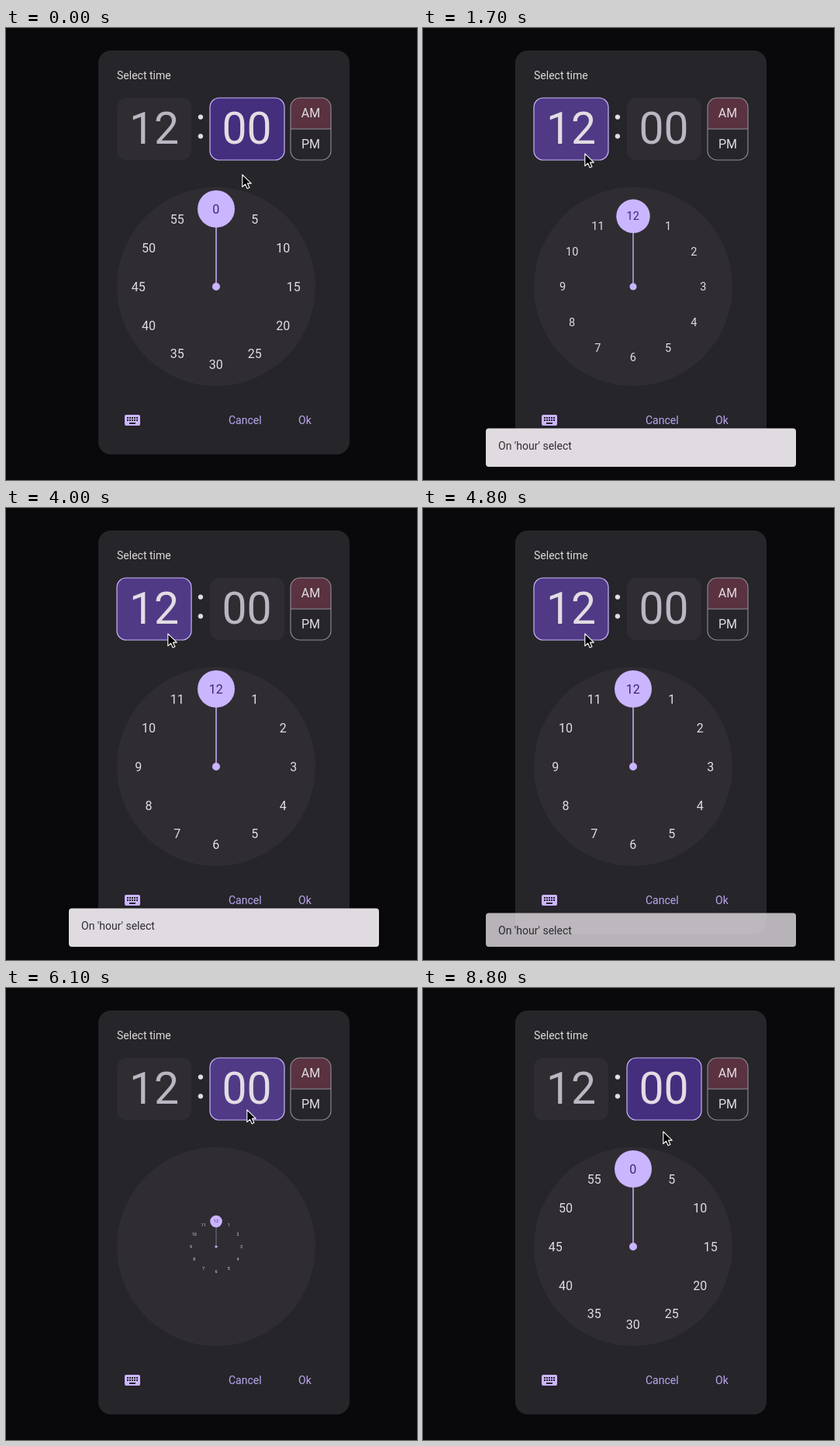
Recreate the animation shown at these times as an HTML page. Size 530x582 px, loop 8.9 s.

```html
<!DOCTYPE html>
<html lang="en">
<head>
<meta charset="utf-8">
<title>Time picker</title>
<style>
html, body { margin: 0; width: 100%; height: 100%; overflow: hidden; background: #09080b; }
svg { display: block; width: 530px; height: 582px; font: 14px Roboto, sans-serif; }
.mid { text-anchor: middle; }
.big { font-size: 57px; }
.num, .half { font-size: 16px; fill: #e2dde3; }
.accent { fill: #cab5ff; }
.label { fill: #bca7f3; }
</style>
</head>
<body>
<svg viewBox="0 0 530 582">
  <rect width="530" height="582" fill="#09080b"/>
  <rect x="119" y="29" width="324" height="520" rx="16" fill="#262529"/>
  <text x="143" y="66" fill="#dedade">Select time</text>

  <g id="hour">
    <rect x="143" y="90" width="96" height="80" rx="12"/>
    <text class="big mid" x="191" y="149">12</text>
  </g>
  <text class="big mid" x="251" y="142" fill="#e2dde3">:</text>
  <g id="minute">
    <rect x="263" y="90" width="96" height="80" rx="12"/>
    <text class="big mid" x="310.5" y="149">00</text>
  </g>

  <path d="M367 130V102a12 12 0 0 1 12-12h28a12 12 0 0 1 12 12v28z" fill="#5a3240"/>
  <path d="M367 130h52" stroke="#928f99"/>
  <rect x="367" y="90" width="52" height="80" rx="12" fill="none" stroke="#928f99" stroke-width="1.1"/>
  <text class="half mid" x="393" y="114.5">AM</text>
  <text class="half mid" x="393" y="154.5">PM</text>

  <circle cx="271" cy="333" r="128" fill="#2f2d32"/>
  <g id="dial">
    <path d="M0 0V-78" stroke="#cab5ff" stroke-width="1.5"/>
    <circle class="accent" r="5"/>
    <circle class="accent" cy="-100" r="24"/>
  </g>

  <g id="keys" transform="translate(151 493)">
    <rect class="accent" x="2" y="5" width="20" height="14" rx="2"/>
  </g>
  <text class="label" x="287" y="510">Cancel</text>
  <text class="label" x="377" y="510">Ok</text>

  <g id="snack" style="filter:drop-shadow(0 1px 2px rgba(0,0,0,.5))">
    <rect x="81" width="400" rx="4" fill="#e0dbe0"/>
    <text x="97" fill="#302e33">On 'hour' select</text>
  </g>

  <path id="cursor" d="M.8.8V16.6l3.8-3.5 2.5 5.7 2.8-1.2-2.5-5.5h4.9z"
    fill="#000" stroke="#fff" stroke-width="1.1" stroke-linejoin="round"/>
</svg>
<script>
const LOOP = 8900, STEP = 100;
const HOUR_CLICK = 1361, MINUTE_CLICK = 6014, ANIM = 200;
const SNACK_IN = 1420, SNACK_OUT = 4780;
// time, x, y of the pointer tip
const POINTER = [
  [0, 304, 188], [1300, 304, 188], [1361, 208, 161], [5800, 208, 161],
  [6000, 310, 156], [6900, 310, 156], [7200, 309, 180], [7400, 309, 184], [LOOP, 309, 184]
];

const $ = id => document.getElementById(id);
const clamp = v => Math.min(1, Math.max(0, v));
const outQuad = p => 1 - (1 - p) ** 2;
const ramp = (t, start) => outQuad(clamp((t - start) / ANIM));

function add(parent, tag, attrs, text = '') {
  const el = document.createElementNS('http://www.w3.org/2000/svg', tag);
  for (const k in attrs) el.setAttribute(k, attrs[k]);
  el.textContent = text;
  return parent.appendChild(el);
}

for (let i = 0; i < 10; i++)
  add($('keys'), 'rect', { x: 5 + i % 5 * 3, y: i < 5 ? 8 : 11, width: 2, height: 2, fill: '#262529' });
add($('keys'), 'rect', { x: 8, y: 15, width: 8, height: 2, fill: '#262529' });

const numbers = Array.from({ length: 12 }, (_, i) => {
  const a = i * Math.PI / 6;
  const el = add($('dial'), 'text', {
    class: 'num mid', x: 100 * Math.sin(a) - 0.3, y: 5.7 - 100 * Math.cos(a)
  });
  if (!i) el.style.fill = '#3c2678';
  return el;
});

function pointerAt(t) {
  const i = POINTER.findIndex(p => p[0] > t);
  const [t0, x0, y0] = POINTER[i - 1], [t1, x1, y1] = POINTER[i];
  const k = (t - t0) / (t1 - t0);
  return [x0 + (x1 - x0) * k, y0 + (y1 - y0) * k];
}

function paintBox(id, left, on, [x, y]) {
  const hover = x >= left && x <= left + 96 && y >= 90 && y <= 170;
  const [rect, text] = $(id).children;
  rect.setAttribute('fill', on ? (hover ? '#503a86' : '#442e7e') : '#2f2d32');
  rect.setAttribute('stroke', on ? '#cab5ff' : 'none');
  rect.setAttribute('stroke-width', 1.2);
  text.setAttribute('fill', on ? '#e2dde3' : '#bbb6c1');
}

function dialScale(t) {
  const click = t >= MINUTE_CLICK ? MINUTE_CLICK : HOUR_CLICK;
  return t < click + ANIM ? 1 - ramp(t, click) : ramp(t, click + ANIM);
}

function draw(t) {
  const tip = pointerAt(t);
  $('cursor').setAttribute('transform', `translate(${tip})`);

  const hourMode = t >= HOUR_CLICK && t < MINUTE_CLICK;
  paintBox('hour', 143, hourMode, tip);
  paintBox('minute', 263, !hourMode, tip);

  const hours = t >= HOUR_CLICK + ANIM && t < MINUTE_CLICK + ANIM;
  numbers.forEach((el, i) => { el.textContent = hours ? i || 12 : i * 5; });
  $('dial').setAttribute('transform', `translate(271 333) scale(${dialScale(t)})`);

  const shown = ramp(t, SNACK_IN) - ramp(t, SNACK_OUT);
  const height = 49.5 * (0.36 + 0.64 * shown), top = 565 - height;
  const [bar, note] = $('snack').children;
  $('snack').setAttribute('opacity', shown);
  bar.setAttribute('y', top);
  bar.setAttribute('height', height);
  note.setAttribute('y', top + 27.5);
}

const start = performance.now();
function tick() {
  const t = (performance.now() - start) % LOOP;
  draw(Math.floor(t / STEP) * STEP);
  requestAnimationFrame(tick);
}
tick();
</script>
</body>
</html>
```
